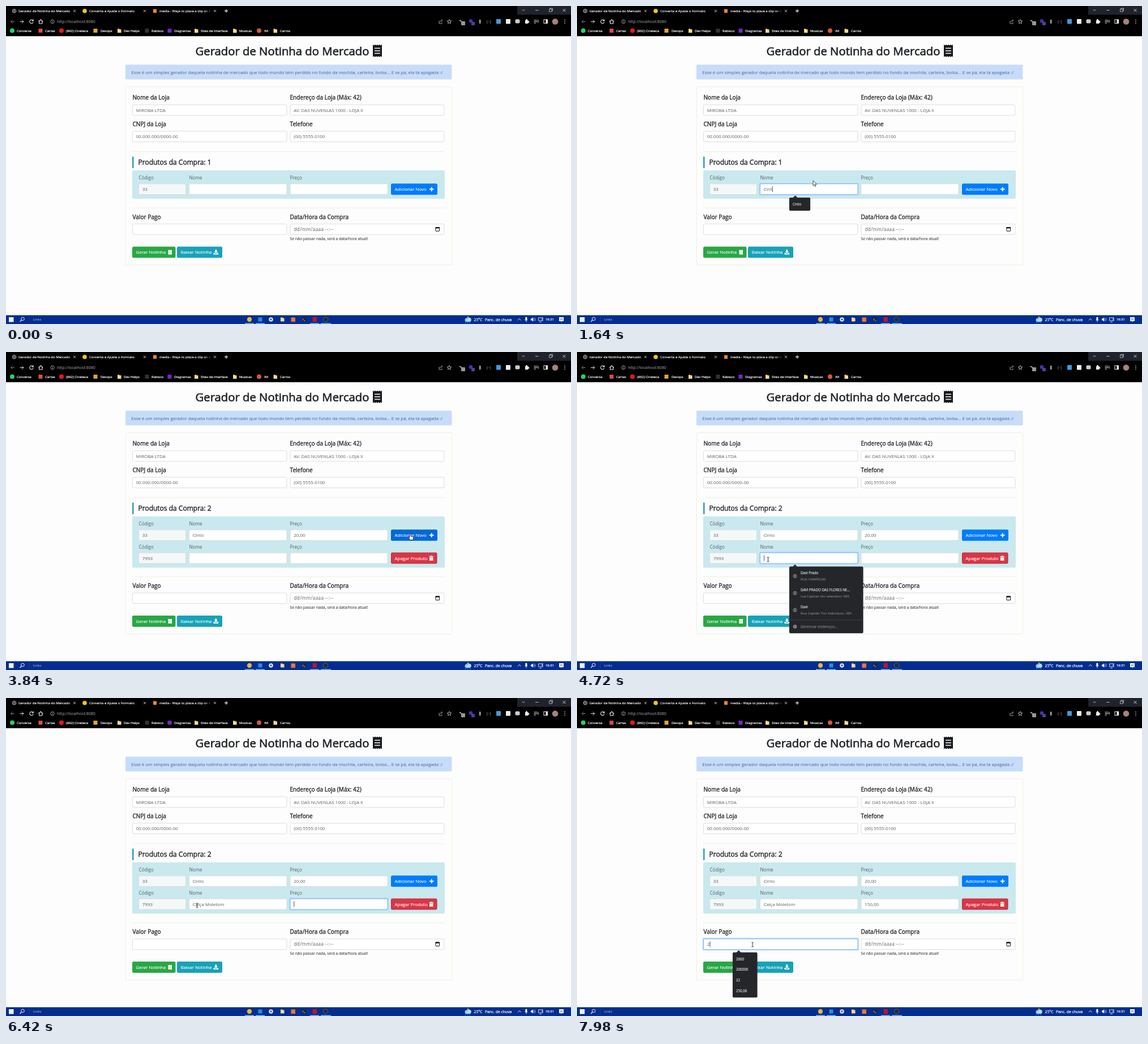
An HTML page that plays this animation: 998x561 px, repeating every 8 s.

```html
<!DOCTYPE html>
<html lang="pt-BR">
<head>
<meta charset="utf-8">
<title>Gerador de Notinha do Mercado</title>
<style>
  html, body { margin: 0; width: 100%; height: 100%; overflow: hidden; background: #fdfdfd; }
  svg { display: block; width: 998px; height: 561px; font-family: "Open Sans", "Noto Sans", sans-serif; }
  text { white-space: pre; }
</style>
</head>
<body>
<svg viewBox="0 0 998 561">
  <defs>
    <linearGradient id="fade"><stop offset="0" stop-opacity="0"/><stop offset="1"/></linearGradient>
  </defs>
  <g id="browser"></g>
  <g id="page"></g>
  <g id="taskbar"></g>
  <g id="pointer"></g>
</svg>
<script>
const LOOP = 8000;
const ROW = 40.5;
const layer = id => document.getElementById(id);

// Drawing helpers
const text = (x, y, s, size = 8, fill = '#575c61', extra = '') =>
  `<text x="${x}" y="${y}" font-size="${size}" fill="${fill}" ${extra}>${s}</text>`;
// Slightly thickened text, between regular and semibold
const strong = (x, y, s, size, fill, weight = .22) =>
  text(x, y, s, size, fill, `stroke="${fill}" stroke-width="${weight}"`);
const heading = (x, y, s, size = 10.1) => strong(x, y, s, size, '#212529', size * .032);
const rect = (x, y, w, h, fill, r = 0, extra = '') =>
  `<rect x="${x}" y="${y}" width="${w}" height="${h}" rx="${r}" fill="${fill}" ${extra}/>`;
const dot = (x, y, r, fill, extra = '') => `<circle cx="${x}" cy="${y}" r="${r}" fill="${fill}" ${extra}/>`;
const line = (d, color = '#ddd', width = 1) =>
  `<path d="${d}" fill="none" stroke="${color}" stroke-width="${width}"/>`;
const shape = (d, fill) => `<path d="${d}" fill="${fill}"/>`;
const group = (dy, content) => `<g transform="translate(0 ${dy})">${content}</g>`;
const cross = (x, y, r = 2) => line(`M${x - r} ${y - r}l${2 * r} ${2 * r}m0 ${-2 * r}l${-2 * r} ${2 * r}`, '#ddd', .9);
const folder = (x, y) => shape(`M${x - 3} ${y - 3.5}h3l1 1h2.5v6h-6.5z`, '#f7dc83');

function drawBrowser() {
  const tabs = [
    [14.5, 22, 'Gerador de Notinha do Mercado', 121],
    [139, 147, 'Converta e Ajuste o Formato', 245],
    [263, 271, 'media - Ways to place a clip on it', 369],
  ];
  let out = rect(0, 0, 998, 53.5, '#000') + rect(903, 0, 95, 15.5, '#20222c');
  out += tabs.map(([, x, s, close]) => strong(x, 11, s, 6, '#ececec') + cross(close, 8.7)).join('');
  out += rect(350, 3, 13, 11, 'url(#fade)') + rect(363, 3, 3, 11, '#000');
  out += dot(14.5, 8.7, 3.2, 'none', 'stroke="#ccc"') + line('M11.5 8.7h6M14.5 5.5v6', '#ccc', .7);
  out += dot(139, 8.7, 3.8, '#f5c518') + rect(260, 5.5, 6, 6.5, '#ef8236');
  out += line('M386 8.7h6M389 5.7v6', '#eee', 1.2);
  out += line('M911.5 6l2.5 2.5 2.5-2.5M935 7.5h5.5', '#ccc', .9);
  out += line('M959.5 5.5h4.5v4.5h-4.5zM961 5.5v-1.5h4.5v4.5h-1.5', '#ccc', .8) + cross(986, 7.5, 2.5);

  // Toolbar
  out += line('M15 27.5h-6.5m3-3l-3 3l3 3', '#777') + line('M24.5 27.5h6.5m-3-3l3 3l-3 3', '#ddd');
  out += line('M47.5 25.5a3.2 3.2 0 1 0 .6 2.8M48.2 23.5v2.8h-2.8', '#eee', 1.1);
  out += line('M57.5 27.5l3.8-3.5l3.8 3.5M58.7 27v4h5.2v-4', '#eee', 1.1);
  out += dot(82, 27.5, 3.2, 'none', 'stroke="#bbb" stroke-width=".8"') + line('M82 27v2.3M82 25.3v.9', '#bbb', .9);
  out += text(90, 30, 'http://localhost:8080', 7, '#a9b0ab');
  out += line('M765 26v5h5v-2M766.5 28.5q.5-3 4-3m-1.5-2l1.7 2l-1.7 2', '#bbb', .8);
  out += line('M783 23.7l1.1 2.5l2.7.2l-2.1 1.8l.7 2.7l-2.4-1.5l-2.4 1.5l.7-2.7l-2.1-1.8l2.7-.2z', '#ddd', .8);
  out += line('M801 25l6 4', '#ddd', 1.5) + rect(804, 27, 7, 7, '#999', 1);
  out += dot(821, 26.5, 3.3, '#3a35b8') + rect(822, 28, 6, 6, '#5b3a9b', 1);
  out += rect(836, 24, 2.5, 7, '#aaa', 1) + text(849, 29.8, '(··)', 6.5, '#b39ad5');
  out += rect(866, 23, 8, 8.5, '#3c9be0', 1) + rect(883, 23, 8, 8.5, '#eee', 1) + rect(899.5, 23.5, 8, 7, '#ccc', 2);
  out += rect(917, 25, 5.5, 6, '#eee', .6) + dot(919.5, 24.5, 1.4, '#eee') + dot(923, 28, 1.4, '#eee');
  out += line('M932.5 25h6M932.5 27.5h6M932.5 30h3.5M940 24.5v5', '#ddd');
  out += rect(950, 24, 6.5, 6.5, 'none', 0, 'stroke="#eee"') + rect(953.5, 24, 3, 6.5, '#eee');
  out += dot(970, 27.5, 5.3, '#a98278');
  out += [24.5, 27.5, 30.5].map(y => dot(987, y, .8, '#ddd')).join('');

  // Bookmarks
  const marks = [
    [11, 19, 'Conversa', '#25d366', 1], [61, 69, 'Cartas', '#e34b3f'], [98, 106, '(862) Cineteca', '#f01818', 1],
    [158, 167, 'Devops', '#e8a32c'], [200, 208, 'Dev Helps'], [249, 257, 'Rabisco', '#333'],
    [289, 297, 'Diagramas', '#7328c9'], [336, 344, 'Sites de Interface'], [404, 412, 'Musicas'],
    [447, 456, 'IM', '#d9582f', 1], [475.5, 484, 'Carros'],
  ];
  out += marks.map(([x, tx, s, color, round]) =>
    (!color ? folder(x, 43.7) : round ? dot(x, 43.5, 4, color) : rect(x - 3.5, 40, 7, 7, color)) +
    strong(tx, 45.9, s, 5.95, '#f2f2f2')).join('');
  return out;
}

function drawTaskbar() {
  let out = rect(0, 545.5, 998, 15.5, '#032d90');
  out += rect(5, 549, 8.5, 8.5, '#eef4ff') + dot(29.5, 552, 2.8, 'none', 'stroke="#eee"') + line('M27.5 554l-3 3', '#eee', 1.2);
  out += line('M41.5 548v10', '#1b439f', .7) + text(48, 555.3, 'Links', 6, '#c3cde6');
  out += dot(430, 553, 4.2, '#e8b43b') + rect(445.5, 549.5, 7, 7, '#2a8fe0') + dot(468, 553, 3.8, '#dde3ee') + dot(468, 553, 1.4, '#28406c');
  out += folder(488, 553) + rect(503.5, 549.5, 7.5, 7.5, '#f07a22') + rect(522, 549.5, 8, 7, '#1c2733');
  out += line('M523.5 551.5l1.8 1.5l-1.8 1.5M526 555h2.5', '#ddd', .8);
  out += rect(541.5, 549, 7.5, 8, '#c1161c') + dot(564.5, 553, 4.3, '#262a33', 'stroke="#777" stroke-width=".7"');
  out += [[422, 16], [441, 16], [537, 16], [556, 18]].map(([x, w]) => rect(x, 559.5, w, 1.5, '#76b9ed')).join('');
  out += dot(814, 554, 3.5, '#8ecbf5') + dot(818, 553.5, 3.8, '#a8dcff') + shape('M816 547l2 3h-4z', '#f29d38');
  out += line('M812 558l-1 2M816 558l-1 2M820 558l-1 2', '#49a6f0', .9);
  out += strong(826.5, 555.7, '25°C', 6.8, '#fff') + strong(846, 555.7, 'Panc. de chuva', 6.8, '#fff');
  out += line('M904 554.5l2.8-3l2.8 3', '#fff', .9) + rect(917.4, 548.5, 3, 6, '#fff', 1.5);
  out += line('M916.5 553q2.4 4.5 4.8 0M919 555.5v2', '#fff', .8);
  out += shape('M927 551.5h1.7l2.5-2.3v7.6l-2.5-2.3h-1.7z', '#fff') + line('M932.5 551q1.5 2 0 4M934 549.8q2.3 3 0 6.4', '#cbd5ec', .7);
  out += line('M940.5 550h6.5v5h-6.5zM942 557.5h4M948 549v7', '#fff', .8);
  out += strong(953, 555.4, '19:31', 5.9, '#fff') + shape('M977 549h8v7h-3l-1.5 1.7v-1.7h-3.5z', '#fff');
  out += line('M978.5 551.5h5M978.5 553.5h5', '#032d90', .6);
  return out;
}

// Form parts
const caretProbe = document.createElement('canvas').getContext('2d');
const textWidth = s => {
  caretProbe.font = '8px "Open Sans", "Noto Sans", sans-serif';
  return caretProbe.measureText(s).width;
};
function input(x, y, w, value = '', { focused, caret, fill = '#fff' } = {}) {
  const border = focused ? '#80bdff' : '#dbdddb';
  return (focused ? rect(x - 1.2, y - 1.2, w + 2.4, 22, '#a9d1fb', 2.5) : '') +
    rect(x + .5, y + .5, w - 1, 18.7, fill, 2, `stroke="${border}"`) +
    text(x + 6.8, y + 12.9, value) +
    (caret ? rect(x + 7 + textWidth(value), y + 4.8, .8, 10, '#222') : '');
}
const button = (x, y, w, s, fill, icon, stroke = fill) =>
  rect(x + .5, y + .5, w - 1, 18.8, fill, 1.5, `stroke="${stroke}"`) + strong(x + 6.6, y + 12.9, s, 7.9, '#fff', .15) + icon;
const rule = y => rect(223, y, 552, 1, '#f1efdd');

const trashIcon = shape('M747.5 360.5h7.5v1.2h-7.5zM749.5 359.5h3.5v1h-3.5zM748 362.4h6.5v5.6h-6.5z', '#fff');
const plusIcon = line('M748 323.3h7.5M751.75 319.5v7.5', '#fff', 1.9);
const noteIcon = rect(286.5, 430.5, 6.5, 8, '#fff') + line('M288 433h3.5M288 435h3.5', '#9bd3a9', .7);
const saveIcon = shape('M369.5 429.8h2.6v3.2h2l-3.3 3.2l-3.3-3.2h2zM366.5 435.5h2l2.3 2l2.3-2h2v3h-8.6z', '#fff');

const balloon = (x, y, w, h, arrowX) =>
  rect(x - .5, y, w + 1, h + 1, '#0002', 2.5) + rect(x, y, w, h, '#25262a', 2) +
  shape(`M${arrowX - 4} ${y + .3}l4-4l4 4z`, '#25262a');

function addressBalloon() {
  const people = [
    ['Davi Prado', 'RUA CAMPELIM'],
    ['DAVI PRADO DAS FLORES NE...', 'rua Capitao tito valenduro 385'],
    ['Davi', 'Rua Capitão Tito Valenduro, 385'],
  ];
  return balloon(375, 338, 130.5, 117.5, 385) + people.map(([name, street], i) => {
    const y = 351.8 + i * 30;
    return dot(385, y + 3, 3, 'none', 'stroke="#aaa" stroke-width=".8"') + dot(385, y + 2.2, 1.1, '#aaa') +
      line(`M383 ${y + 5.2}q2-2.4 4 0`, '#aaa', .8) +
      strong(395, y, name, 6.2, '#f1f1f1', .12) + text(395, y + 11, street, 6.05, '#a0a1a4');
  }).join('') + rect(375, 432, 130.5, .8, '#45464a') + dot(385, 444, 3.2, '#8c8d90') + dot(385, 444, 1, '#333') +
    text(395, 446.5, 'Gerenciar endereços...', 6.25, '#9a9b9e');
}
const listBalloon = (x, y, w, items) =>
  balloon(x, y, w, 4.2 + 18.8 * items.length, x + 10.5) +
  items.map((s, i) => strong(x + 6, y + 13.9 + i * 18.7, s, 6.2, '#f1f1f1', .12)).join('');

// Timeline
const prefixes = s => [...s].map((_, i) => s.slice(0, i + 1));
const typing = {
  name1: { start: 1100, step: 170, states: prefixes('Cinto') },
  price1: { start: 2500, step: 210, states: ['2', '20', '2,00', '20,00'] },
  name2: { start: 4950, step: 80, states: prefixes('Calça Moletom') },
  price2: { start: 6600, step: 95, states: ['1', '15', '1,50', '15,00', '150,00'] },
  paid: { start: 7850, step: 200, states: ['2'] },
};
const focusTimes = [[0, ''], [650, 'name1'], [2150, 'price1'], [3800, ''], [4550, 'name2'], [6150, 'price2'], [7600, 'paid']];
const pointerPath = [
  [120, 545, 570], [620, 422, 312], [1300, 422, 312], [1600, 417, 308], [2300, 417, 308], [2700, 415, 307],
  [3250, 415, 307], [3700, 714, 321], [3920, 714, 321], [4450, 337.5, 366], [7120, 337.5, 366], [7520, 310, 435],
];
const overButton = t => t > 3620 && t < 3990;

function drawPage(t) {
  const [focusedAt, focus] = focusTimes.findLast(([at]) => t >= at);
  let lastKey = focusedAt;
  const values = {};
  for (const [field, { start, step, states }] of Object.entries(typing)) {
    const i = Math.min(Math.floor((t - start) / step), states.length - 1);
    values[field] = i < 0 ? '' : states[i];
    if (field === focus && i >= 0) lastKey = start + i * step;
  }
  const caretOn = (t - lastKey) % 1000 < 500;
  const field = (id, x, y, w) =>
    input(x, y, w, values[id], { focused: focus === id, caret: focus === id && caretOn });
  const row = (n, code) =>
    text(234.5, 306, 'Código', 8.1) + text(323.5, 306, 'Nome', 8.1) + text(501.5, 306, 'Preço', 8.1) +
    input(234, 313.3, 84, code, { fill: '#f5f8f9' }) +
    field('name' + n, 323, 313.3, 173.5) + field('price' + n, 501.5, 313.3, 173);

  const two = t >= 3800;
  const dy = two ? ROW : 0;

  let out = rect(0, 53.5, 998, 492, '#fdfdfd') + heading(334.5, 86.7, 'Gerador de Notinha do Mercado', 20.3);
  out += shape('M648 68l2 1.5l2-1.5l2 1.5l2-1.5l2 1.5l2-1.5l2 1.5l2-1.5v22l-2-1.5l-2 1.5l-2-1.5l-2 1.5l-2-1.5l-2 1.5l-2-1.5l-2 1.5z', '#17191c');
  out += line('M651 74.5h10M651 79h10M651 83.5h10', '#fff', 1.5);
  out += rect(211, 103.5, 576.5, 26, '#c6dcf9', 2);
  out += text(221.5, 119.6, 'Esse é um simples gerador daquela notinha de mercado que todo mundo tem perdido no fundo da mochila, carteira, bolsa... E se pá, ela tá apagada :/', 7.88, '#45648a');
  out += rect(211.5, 142.5, 576, 314.5 + dy, '#fdfdfd', 1, 'stroke="#f0eedf"');
  out += heading(223.5, 165, 'Nome da Loja') + heading(501.5, 165, 'Endereço da Loja (Máx: 42)');
  out += input(223, 173.7, 273.5, 'MIROBA LTDA') + input(501.5, 173.7, 273, 'AV. DAS NUVENLAS 1000 - LOJA X');
  out += heading(223.5, 212, 'CNPJ da Loja') + heading(501.5, 212, 'Telefone');
  out += input(223, 220.4, 273.5, '00.000.000/0000-00') + input(501.5, 220.4, 273, '(00) 5555-0100');
  out += rule(256.5) + rect(223, 265.7, 2.5, 20.3, '#2a9fb4') + heading(233.5, 280.4, `Produtos da Compra: ${two ? 2 : 1}`, 12);
  out += rect(223, 290, 552, 50 + dy, '#c9e9ee', 2);
  out += row(1, '33') + button(680, 313.3, 82, 'Adicionar Novo', overButton(t) ? '#0069d9' : '#007bff', plusIcon);
  if (two) out += group(ROW, row(2, '7993')) + button(680, 353.7, 81.5, 'Apagar Produto', '#dc3545', trashIcon, '#b02835');

  let lower = rule(355.7) + heading(223.5, 375.5, 'Valor Pago') + heading(501.5, 375.5, 'Data/Hora da Compra');
  lower += field('paid', 223, 384, 273.5) + input(501.5, 384, 273);
  lower += text(508.5, 396.9, 'dd/mm/aaaa --:--', 8.1, '#575c61', 'letter-spacing=".4"');
  lower += rect(759, 390.7, 6.5, 6.5, '#fff', .5, 'stroke="#111"') + rect(758.5, 390, 7.5, 2.3, '#111');
  lower += strong(501.5, 412.6, 'Se não passar nada, será a data/hora atual!', 6.85, '#3d4247', .12);
  lower += button(223, 424.5, 76.5, 'Gerar Notinha', '#28a745', noteIcon) + button(302, 424.5, 80, 'Baixar Notinha', '#17a2b8', saveIcon);
  out += group(dy, lower);

  // Suggestions
  if (focus === 'name1') {
    if (!values.name1) out += addressBalloon();
    else if (values.name1 !== 'Cinto') out += listBalloon(375, 338, 37, ['Cinto']);
  } else if (focus === 'name2') {
    if (!values.name2) out += group(ROW, addressBalloon());
    else if (t < 5800) out += group(ROW, listBalloon(375, 338, 56, ['Calça Moletom']));
  } else if (focus === 'paid' && values.paid) {
    out += listBalloon(275, 448.8, 43.5, ['2000', '200000', '22', '250,00']);
  }
  return out;
}

const arrow = '<path d="M0 0v9l2.1-1.9l1.4 3.2l1.5-.7l-1.4-3.1h2.8z" fill="#fff" stroke="#222" stroke-width=".8"/>';
const beam = line('M-1.8-4q1.8 0 1.8 1v6q0 1-1.8 1M1.8-4q-1.8 0-1.8 1M0 3q0 1 1.8 1', '#222', .9);
const hand = '<path d="M-1 0q1-1 2 0v4l4 1q1 .4 .7 2l-.7 3.5h-5l-3-4q0-1.5 2 0z" fill="#fff" stroke="#222" stroke-width=".8"/>';

function drawPointer(t) {
  if (t < pointerPath[0][0]) return '';
  const i = pointerPath.findLastIndex(([at]) => t >= at);
  const [t0, x0, y0] = pointerPath[i];
  const [t1, x1, y1] = pointerPath[i + 1] || [LOOP, x0, y0];
  const p = (t - t0) / (t1 - t0);
  const ease = p * p * (3 - 2 * p);
  const x = x0 + (x1 - x0) * ease, y = y0 + (y1 - y0) * ease;
  const kind = overButton(t) ? hand : t > 4380 ? beam : arrow;
  return `<g transform="translate(${x} ${y})">${kind}</g>`;
}

layer('browser').innerHTML = drawBrowser();
layer('taskbar').innerHTML = drawTaskbar();
let shown = '';
const begin = performance.now();
function frame() {
  const t = (performance.now() - begin) % LOOP;
  const page = drawPage(t);
  if (page !== shown) layer('page').innerHTML = shown = page;
  layer('pointer').innerHTML = drawPointer(t);
  requestAnimationFrame(frame);
}
frame();
</script>
</body>
</html>
```
